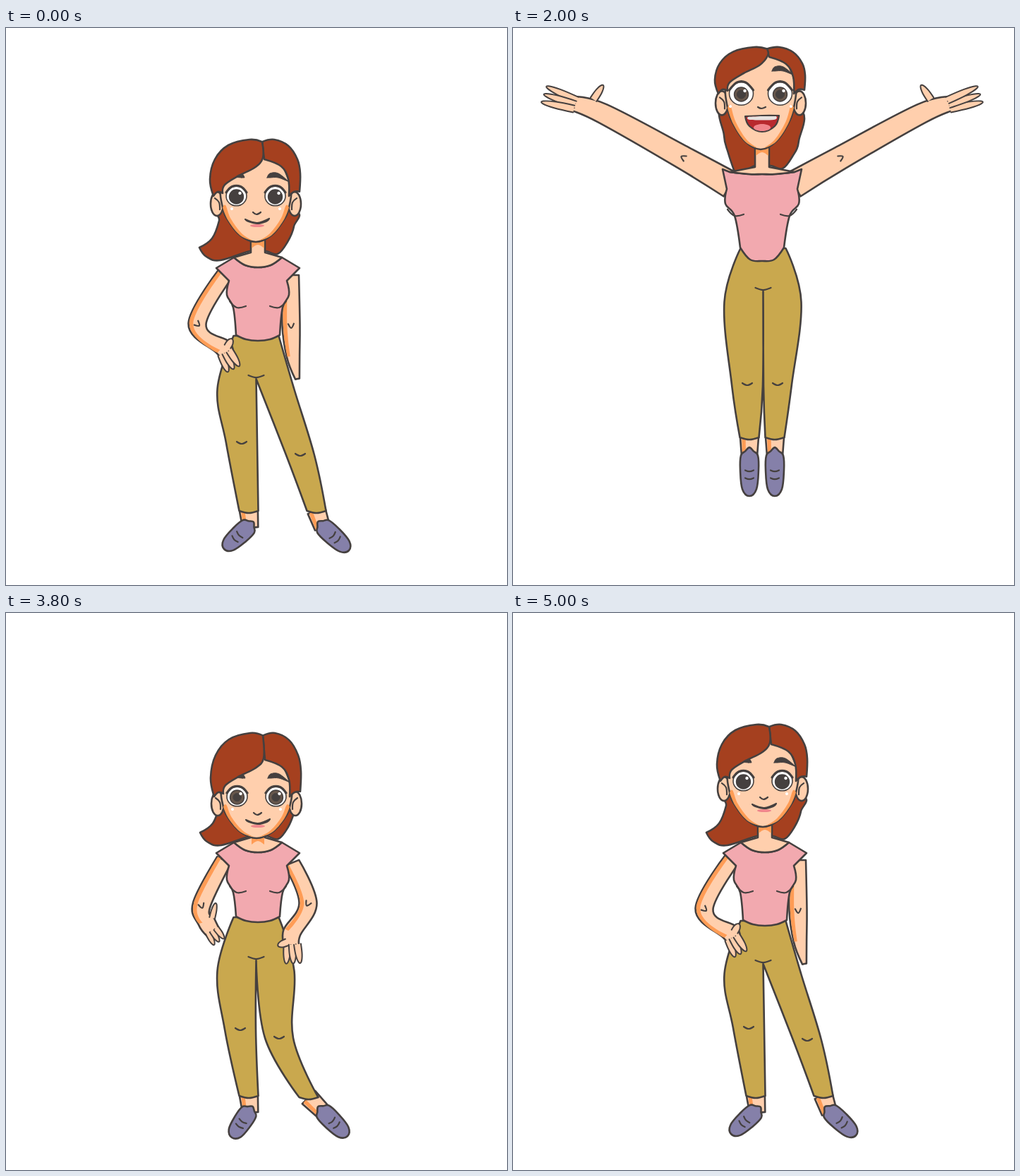
Animation of 710 by 789 pixels, one loop 5100 ms. Source, as an HTML page:

```html
<!DOCTYPE html>
<html lang="en">
<head>
<meta charset="utf-8">
<title>Happy jump</title>
<style>
html, body { margin: 0; width: 100%; height: 100%; overflow: hidden; background: #fff; }
svg { display: block; width: 100vw; height: 100vh; }
path { stroke: #45403f; stroke-width: 2.6; stroke-linejoin: round; stroke-linecap: round; }
.skin { fill: #ffcfad; }
.hair { fill: #a5401f; }
.shirt { fill: #f2a9af; }
.pants { fill: #c9a84e; }
.shoe { fill: #8580a9; }
.white { fill: #fff; stroke-width: 1.6; }
.iris { fill: #66564b; stroke-width: 1.4; }
.dark { fill: #45403f; stroke-width: 1; }
.mouth { fill: #b8292e; stroke-width: 2.2; }
.shade { fill: #ff9c55; stroke: none; }
.glint { fill: #fff; stroke: none; }
.teeth { fill: #e6e2e0; stroke: none; }
.pink { fill: #f0868c; stroke: none; }
.finger { fill: #ffcfad; stroke-width: 2; }
.line { fill: none; stroke-width: 2.2; }
.lid { fill: none; stroke-width: 3.2; }
</style>
</head>
<body>
<svg id="stage" viewBox="0 0 710 789"></svg>
<script>
const LOOP = 5100, JUMPS = [3800, 1500];
const stage = document.getElementById('stage');

// Joints of the figure; x always comes first
const flipArm = arm => Object.fromEntries(Object.entries(arm).map(([name, v]) =>
  [name, Array.isArray(v) ? [706 - v[0], v[1]] : v]));

const armUp = { shoulder: [308, 222], elbow: [242, 184], wrist: [127, 121], palm: [84, 107], thumb: [127, 82], grip: 10, reach: 40 };

const stand = {
  head: [354, 238], crown: 80, jaw: 65, pupil: 9.5, lift: 0, chest: 357, neck: 325, waist: 437,
  arms: [
    { shoulder: [313, 345], elbow: [271, 419], wrist: [307, 452], palm: [313, 464], thumb: [320, 441], grip: 10, reach: 20 },
    { shoulder: [404, 350], elbow: [404, 421], wrist: [407, 465], palm: [413, 497], thumb: [412, 488], grip: 3, reach: 0 }
  ],
  legs: [
    { knee: [334, 588], ankle: [344, 684], heel: [346, 704], toe: [309, 738] },
    { knee: [417, 605], ankle: [440, 684], heel: [447, 704], toe: [486, 740] }
  ]
};
const dip = {
  head: [355, 260], crown: 90, jaw: 59, pupil: 5.5, lift: 0, chest: 357, neck: 325, waist: 432,
  arms: [
    { shoulder: [309, 350], elbow: [277, 414], wrist: [284, 437], palm: [294, 453], thumb: [297, 412], grip: 10, reach: 14 },
    { shoulder: [405, 354], elbow: [428, 411], wrist: [405, 453], palm: [406, 474], thumb: [386, 471], grip: 11, reach: 21 }
  ],
  legs: [
    { knee: [332, 590], ankle: [344, 684], heel: [346, 704], toe: [320, 743] },
    { knee: [387, 602], ankle: [429, 686], heel: [447, 704], toe: [484, 741] }
  ]
};
const leap = {
  head: [351, 93], crown: 66, jaw: 79, pupil: 6, lift: 1, chest: 353, neck: 204, waist: 313,
  arms: [armUp, flipArm(armUp)],
  legs: [
    { knee: [332, 505], ankle: [335, 580], heel: [335, 602], toe: [335, 663] },
    { knee: [375, 505], ankle: [371, 580], heel: [371, 602], toe: [371, 663] }
  ]
};

// Weighted blend of whole poses
function blend(weights, values) {
  const first = values[0];
  if (typeof first === 'number') return values.reduce((sum, v, i) => sum + v * weights[i], 0);
  if (Array.isArray(first)) return first.map((_, i) => blend(weights, values.map(v => v[i])));
  return Object.fromEntries(Object.keys(first).map(k => [k, blend(weights, values.map(v => v[k]))]));
}

// Smooth path; a third value in a point makes it a corner
function curve(pts, open) {
  const n = pts.length, at = i => pts[(i + n) % n];
  const xy = p => p[0].toFixed(1) + ',' + p[1].toFixed(1);
  const handle = (i, sign) => {
    const p = at(i), end = open && (i === 0 || i === n - 1);
    if (p[2] || end) return xy(p);
    return xy([0, 1].map(c => p[c] + sign * (at(i + 1)[c] - at(i - 1)[c]) / 5.5));
  };
  let d = 'M' + xy(pts[0]);
  for (let i = 0; i < (open ? n - 1 : n); i++) {
    d += `C${handle(i, 1)} ${handle(i + 1, -1)} ${xy(at(i + 1))}`;
  }
  return open ? d : d + 'Z';
}

const along = (p, q, t) => [0, 1].map(c => p[c] + (q[c] - p[c]) * t);
const corner = p => [p[0], p[1], 1];
const mirror = pts => pts.map(([x, y, c]) => [-x, y, c]).reverse();
const shift = (pts, dx, dy = 0) => pts.map(([x, y, c]) => [x + dx, y + dy, c]);
const symmetric = (half, x, y) => shift([...half, ...mirror(half.filter(p => p[0]))], x, y);

function unit(p, q) {
  const dx = q[0] - p[0], dy = q[1] - p[1], len = Math.hypot(dx, dy) || 1;
  return [dx / len, dy / len];
}

// Line beside a chain of joints, its ends being corners
function edge(joints, widths, side) {
  const last = joints.length - 1;
  return joints.map((p, i) => {
    const [dx, dy] = unit(joints[Math.max(i - 1, 0)], joints[Math.min(i + 1, last)]);
    const w = widths[i] * side;
    return [p[0] + dy * w, p[1] - dx * w, i === 0 || i === last];
  });
}
const limb = (joints, outer, inner = outer, sides = [1, -1]) =>
  [...edge(joints, outer, sides[0]), ...edge(joints, inner, sides[1]).reverse()];
const rim = (joints, widths) =>
  limb(joints, widths.map(w => w * .9), widths.map(w => w * .45), [-1, -1]);

function oval(x, y, rx, ry = rx) {
  return Array.from({ length: 8 }, (_, i) => {
    const a = i * Math.PI / 4;
    return [x + rx * Math.cos(a), y + ry * Math.sin(a)];
  });
}

function draw(pose) {
  const { lift, chest, neck, waist, crown, jaw, pupil } = pose;
  const [hx, hy] = pose.head, chin = hy + jaw, hips = 354.5;
  let out = '';
  const add = (kind, pts, open) => { out += `<path class="${kind}" d="${curve(pts, open)}"/>`; };
  const line = (pts, kind = 'line') => add(kind, pts, true);

  function backHair() {
    const curl = 1 - lift;
    add('hair', shift([
      [-50, hy + 14 - neck], [-52, -52], [-62 + 16 * lift, -27], [-80 + 43 * lift, -14 * curl, 1],
      [-70 + 35 * lift, -1], [-50 + 18 * lift, 4], [-8, -9], [14, -9], [31, -5], [45, -22],
      [54, -44], [53, hy + 20 - neck]
    ], hx, neck));
  }

  function foot({ ankle, heel, toe }) {
    const shin = [ankle, along(ankle, heel, 1.2)];
    add('skin', limb(shin, [13, 11]));
    add('shade', rim(shin, [12, 11]));
    const [fx, fy] = unit(heel, toe), len = Math.hypot(toe[0] - heel[0], toe[1] - heel[1]);
    const place = ([s, f]) => [heel[0] + fx * f * len - fy * s, heel[1] + fy * f * len + fx * s];
    add('shoe', symmetric([[0, -.13], [6, -.04], [12, .06], [13, .4], [10, .84], [0, 1]], 0, 0).map(place));
    for (const f of [.4, .58]) line([[-6, f], [0, f + .03], [6, f]].map(place));
  }

  function trousers() {
    const [l, r] = pose.legs;
    const beside = (p, dx, c) => [p[0] + dx, p[1], c];
    const cuff = p => [beside(p, -13.5, 1), [p[0], p[1] + 3], beside(p, 13.5, 1)];
    add('pants', [
      [hips - 32, waist - 1, 1], [hips - 55, waist + 75], beside(l.knee, -22), ...cuff(l.ankle),
      beside(l.knee, 22), [hips, waist + 60, 1], beside(r.knee, -20), ...cuff(r.ankle),
      beside(r.knee, 20), [hips + 54, waist + 75], [hips + 32, waist - 1, 1]
    ]);
    const fold = (x, y, w) => line([[x - w, y - 3], [x, y], [x + w, y - 3]]);
    fold(hips, waist + 58, 11);
    for (const { knee } of pose.legs) fold(knee[0], knee[1] + 1, 7);
  }

  function arm({ shoulder, elbow, wrist, palm, thumb, grip, reach }) {
    const joints = [shoulder, elbow, wrist, palm];
    const widths = [11 + 8 * lift, 12.5 + 4 * lift, 8 + grip * .4 + lift * 2, grip];
    add('skin', limb(joints, widths));
    if (lift < .5) add('shade', rim(joints.slice(0, 3), widths));
    const [dx, dy] = unit(wrist, palm), thick = Math.min(4.5, reach / 4);
    const root = along(along(wrist, palm, .5), thumb, .4);
    const digit = (from, to) => {
      const mid = along(from, to, .6), tip = along(from, to, 1);
      const w = [thick + .5, thick, thick * .4];
      line([...edge([from, mid, tip], w, 1), ...edge([from, mid, tip], w, -1).reverse()].map(p => p.slice(0, 2)), 'finger');
    };
    for (const i of [-1, 0, 1]) {
      const from = [palm[0] + dy * i * grip * .65, palm[1] - dx * i * grip * .65];
      const spread = i * reach * .12;
      digit(along(wrist, palm, 0).map((c, k) => from[k] - [dx, dy][k] * thick),
        [from[0] + dx * reach + dy * spread, from[1] + dy * reach - dx * spread]);
    }
    if (reach > 5) digit(root, thumb);
    const [ex, ey] = unit(elbow, wrist);
    line([[-2, -4], [4, 0], [-2, 4]].map(([f, s]) =>
      [elbow[0] + ex * f - ey * s, elbow[1] + ey * f + ex * s]));
  }

  function top() {
    const hem = waist + 6 + 11 * lift - neck;
    const collar = [[0, 14 - 11 * lift], [18, 11 - 8 * lift], [34 + 12 * lift, 0, 1]];
    const under = [35 + 4 * lift, 71 - 9 * lift];
    add('shirt', symmetric([
      ...collar, [59 - 3 * lift, 15 - 19 * lift, 1], [41 + 9 * lift, 33 - 9 * lift, 1],
      [44 + 8 * lift, 53 - 8 * lift], under, [31, waist - 2 - neck, 1], [17, hem - 2], [0, hem]
    ], chest, neck));
    for (const side of [-1, 1]) {
      line([[5, -9], [-5, 0], [-18, -2]].map(([x, y]) =>
        [chest + side * (under[0] + x + lift * 5), neck + under[1] + y]));
    }
    add('skin', symmetric([...collar, [10, -7, 1], [10, chin - 6 - neck, 1]], chest, neck));
    add('shade', symmetric([[9, -5, 1], [9, 9, 1], [0, 4]], chest, chin));
  }

  // Face measures run from a point between the eyes; jaw heights are shares of the jaw
  const onFace = pts => shift(pts, hx, hy);

  function face() {
    const cheek = [[47, .25], [39, .54], [22, .86]].map(([x, v]) => [x, v * jaw]);
    for (const side of [-1, 1]) {
      const ear = side * 55, y = jaw * .17;
      add('skin', onFace(oval(ear, y, 9, 17)));
      line(onFace([[ear + side * 3, y - 8], [ear - side * 3, y - 2], [ear - side * 4, y + 8]]));
    }
    add('skin', symmetric([[0, -58], [30, -52], [49, -15], ...cheek, [0, jaw]], hx, hy));
    const inner = cheek.map(([x, y]) => [x * .91, y - 3]).reverse();
    const strip = [corner(cheek[0]), cheek[1], cheek[2], [4, jaw - 2, 1], ...inner];
    for (const pts of [strip, mirror(strip)]) add('shade', onFace(pts));
  }

  function features() {
    for (const side of [-1, 1]) {
      const x = side * 27.5, wide = 14.5 + 2.5 * lift;
      add('white', onFace(oval(x, 0, wide, wide - .7)));
      add('iris', onFace(oval(x, 1, 10)));
      add('dark', onFace(oval(x, 1, pupil)));
      add('glint', onFace(oval(x + 5, -4, 2.2)));
      line(onFace([[x - wide, -5], [x - 6, -wide + 1], [x + 6, -wide + 1], [x + wide, -5]]), 'lid');
      add('glint', onFace(oval(side * (34 + 9 * lift), 18, 2)));
      const brow = [[16, -26, 1], [20, -32], [32, -32], [47, -20, 1], [32, -26], [20, -26]];
      add('dark', shift(side > 0 ? brow : mirror(brow), hx, hy - 6 * lift));
    }
    line(onFace([[-4, 23 - 4 * lift], [1, 26 - 5 * lift], [7, 23 - 4 * lift]]));

    const w = 17 + 7 * lift, atMouth = pts => shift(pts, hx + 2, hy + 36 - 4 * lift);
    add('mouth', atMouth([
      [-w, -3 + 3 * lift, 1], [0, 2 - 3 * lift], [w, -4 + 3 * lift, 1],
      [w * .75, 14 * lift], [0, 3 + 19 * lift], [-w * .75, 14 * lift]
    ]));
    if (lift > .2) add('teeth', atMouth([[4 - w, 1, 1], [0, 0], [w - 4, 0, 1], [w * .7, 5 * lift], [-w * .7, 5 * lift]]));
    add('pink', atMouth(oval(0, 6 + 10 * lift, 10 + 2 * lift, 2 + 3 * lift)));
  }

  function frontHair() {
    const strand = (shape, fringe) =>
      add('hair', onFace([...shape.map(([x, v, c]) => [x, v * crown, c]), ...fringe]));
    strand([[9, -.96, 1], [26, -1], [46, -.89], [59, -.65], [63, -.4], [62, -.08, 1]],
      [[54, -6], [47, 0, 1], [46, -24], [36, -42], [12, -52, 1]]);
    strand([[9, -.96, 1], [-9, -1], [-39, -.9], [-58, -.65], [-65, -.3], [-60, 0, 1]],
      [[-54, -6], [-47, -4, 1], [-44, -16], [-24, -29], [-2, -40], [10, -54]]);
  }

  backHair();
  pose.legs.forEach(foot);
  trousers();
  pose.arms.forEach(arm);
  top();
  face();
  features();
  frontHair();
  stage.innerHTML = out;
}

// Time since the jump began, then the shares of stand, dip and leap
const STAND = [1, 0, 0], CROUCH = [-.4, 1.4, 0], DIP = [0, 1, 0];
const rise = t => [0, 1 - t, t];
const JUMP = [
  [0, DIP], [100, CROUCH], [300, rise(.35)], [400, rise(.75)], [500, rise(1)],
  [700, rise(.8)], [800, rise(.4)], [900, CROUCH], [1000, DIP], [1100, [.5, .5, 0]], [1200, STAND]
];

function sharesAt(time) {
  const start = JUMPS.find(s => time >= s);
  if (start === undefined) return STAND;
  return JUMP.filter(([from]) => time - start >= from).pop()[1];
}

let shown;
function tick() {
  const shares = sharesAt(performance.now() % LOOP);
  if (shares !== shown) draw(blend(shown = shares, [stand, dip, leap]));
  requestAnimationFrame(tick);
}
tick();
</script>
</body>
</html>
```
